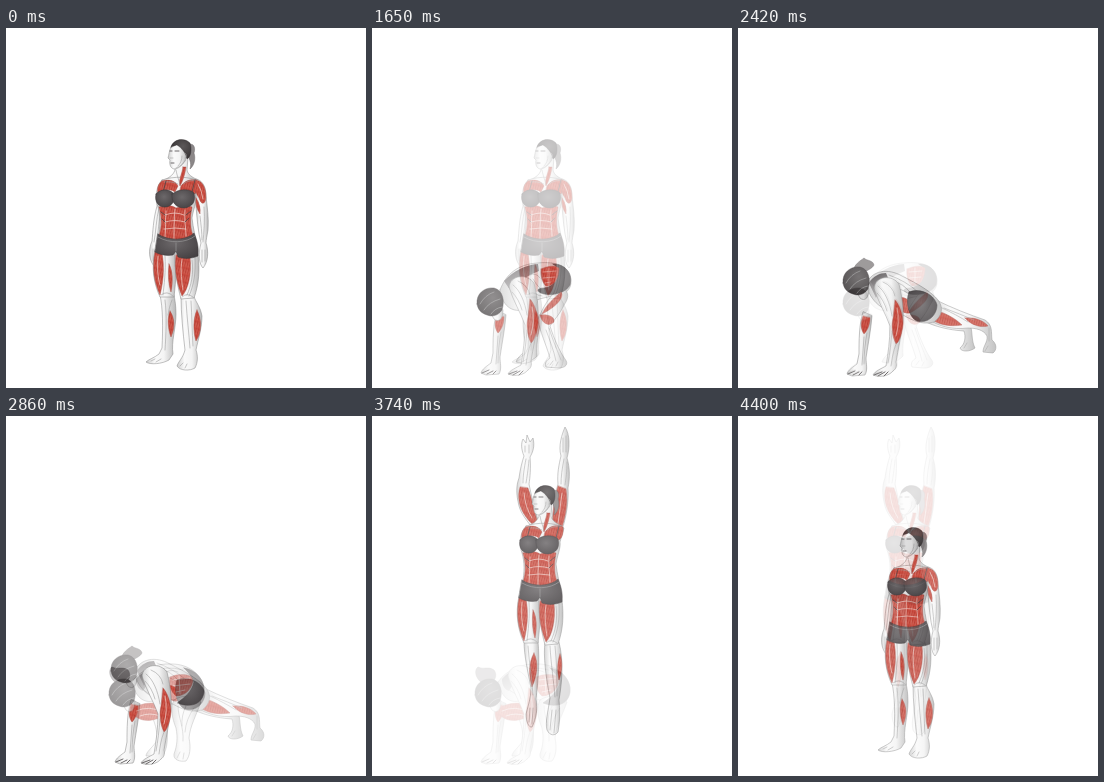
Write an HTML page without scripts that moves like this. It is 360 by 360 pixels and loops after 4510 ms.

```html
<!DOCTYPE html>
<html lang="en">
<head>
<meta charset="utf-8">
<title>Burpee exercise</title>
<style>
html, body { margin: 0; width: 100%; height: 100%; overflow: hidden; background: #fff; }
svg { display: block; width: 100vw; height: 100vh; }
path { stroke-linejoin: round; stroke-linecap: round; }
.skin { fill: url(#skin); stroke: #858585; stroke-width: .5; }
.red { fill: url(#fibre); stroke: #a04a42; stroke-width: .4; }
.cloth { fill: url(#cloth); stroke: #3a3739; stroke-width: .5; }
.shade { fill: url(#shade); }
.hair { fill: url(#hair); stroke: #2b2829; stroke-width: .4; }
.tail { fill: #8b8788; stroke: #5b5758; stroke-width: .4; }
.line { fill: none; stroke: #a0a0a0; stroke-width: .6; }
.dark { fill: none; stroke: #4a4647; stroke-width: .8; }
.pale { fill: none; stroke: #f0d4cf; stroke-width: .7; }

/* Each pose dissolves over the one before it in steps of 110 ms. */
.pose { opacity: 0; animation: 4510ms infinite; }
.down { animation-name: down; }
.plank { animation-name: plank; }
.back { animation-name: back; }
.jump { animation-name: jump; }
.land { animation-name: land; }
@keyframes down {
  0% { opacity: 0; }
  29.268% { opacity: 0; animation-timing-function: steps(6, start); }
  43.902%, 100% { opacity: 1; }
}
@keyframes plank {
  0% { opacity: 0; }
  43.902% { opacity: 0; animation-timing-function: steps(6, start); }
  58.536%, 100% { opacity: 1; }
}
@keyframes back {
  0% { opacity: 0; }
  58.536% { opacity: 0; animation-timing-function: steps(6, start); }
  73.17%, 100% { opacity: 1; }
}
@keyframes jump {
  0% { opacity: 0; }
  73.17% { opacity: 0; animation-timing-function: steps(6, start); }
  87.804%, 100% { opacity: 1; }
}
@keyframes land {
  0% { opacity: 0; }
  87.804% { opacity: 0; animation-timing-function: steps(5, start); }
  100% { opacity: .8333; }
}
</style>
</head>
<body>
<svg viewBox="0 0 360 360">
<defs>
  <linearGradient id="skin">
    <stop offset="0" stop-color="#cecece"/>
    <stop offset=".3" stop-color="#fafafa"/>
    <stop offset=".6" stop-color="#f4f4f4"/>
    <stop offset="1" stop-color="#b8b8b8"/>
  </linearGradient>
  <radialGradient id="cloth" cx=".45" cy=".4" r=".7">
    <stop offset="0" stop-color="#6c686a"/>
    <stop offset="1" stop-color="#444042"/>
  </radialGradient>
  <linearGradient id="shade" x2=".4" y2="1">
    <stop offset="0" stop-color="#5d595b"/>
    <stop offset="1" stop-color="#b5b3b4"/>
  </linearGradient>
  <radialGradient id="hair" cx=".6" cy=".35" r=".7">
    <stop offset="0" stop-color="#5c5859"/>
    <stop offset="1" stop-color="#353132"/>
  </radialGradient>
  <pattern id="fibre" width="2.4" height="7" patternUnits="userSpaceOnUse" patternTransform="rotate(14)">
    <rect width="2.4" height="7" fill="#c9493d"/>
    <path d="M.5 0V5" stroke="#aa392f" stroke-width=".5"/>
    <path d="M1.7 2V6" stroke="#dc7e72" stroke-width=".5"/>
  </pattern>
  <rect id="paper" width="360" height="360" fill="#fff"/>

  <!-- upright head, torso and thighs -->
  <g id="trunk">
    <path class="tail" d="M181 118C187 113 190 119 188 125C190 131 188 138 184 141C186 135 183 130 181 126Z"/>
    <path class="skin" d="M169 136L169 142C167 148 162 150 156 153L192 152C186 149 182 147 181 142L182 129Z"/>
    <path class="skin" d="M149 222C145 240 148 256 154 269L168 269C170 252 171 238 169 224Z"/>
    <path class="skin" d="M169 224C168 240 171 256 175 271L188 270C193 256 194 242 192 226Z"/>
    <path class="red" d="M149 224C146 240 148 254 154 267C157 255 159 240 156 225Z"/>
    <path class="red" d="M163 236C167 243 167 254 165 264C162 255 162 245 163 236Z"/>
    <path class="red" d="M170 227C168 242 171 256 176 268C182 262 186 246 184 229Z"/>
    <path class="pale" d="M176 231C174 243 176 255 177 262M152 228C151 241 152 251 154 257"/>
    <path class="line" d="M189 229C190 244 188 257 183 268M186 232C188 246 185 258 181 267M159 228C160 244 158 257 157 267M155 267Q161 262 167 268M176 269Q181 264 187 269"/>
    <path class="skin" d="M156 152C150 158 150 166 151 176C154 184 155 194 153 206L150 218L191 220C190 210 187 200 186 190C187 182 191 174 190 168L194 154C184 148 168 148 156 152Z"/>
    <path class="red" d="M156 153C162 151 169 152 172 158L169 164C163 160 157 162 152 166C151 160 152 156 156 153Z"/>
    <path class="red" d="M175 158C180 151 187 151 193 153C194 160 191 166 188 166C182 161 178 162 173 166Z"/>
    <path class="red" d="M177 139L180 139C179 146 177 153 174 158C172 153 176 146 177 139Z"/>
    <path class="line" d="M170 142C171 148 173 152 174 157M158 154Q166 153 172 156M177 156Q184 151 190 153"/>
    <path class="red" d="M153 179C162 176 167 178 170 180C176 178 182 177 186 179C184 190 184 200 187 207C182 214 164 215 153 208C156 198 156 190 153 179Z"/>
    <path class="pale" d="M169 181C168 192 168 202 168 212M159 187Q169 183 178 187M159 194Q169 191 179 194M158 201Q169 199 180 201M160 183C159 192 160 201 159 209M179 182C178 191 180 201 180 208"/>
    <path class="dark" d="M155 184l4 3M156 191l3 3M185 183l-5 4M183 190l-4 4M157 164L160 153M186 164L189 152"/>
    <path class="cloth" d="M150 166C154 161 163 160 168 166C169 172 167 178 160 179C153 180 148 174 150 166Z"/>
    <path class="cloth" d="M166 166C172 161 183 160 188 165C190 173 187 179 178 180C170 180 165 174 166 166Z"/>
    <path class="cloth" d="M152 206C162 213 180 213 188 205C191 212 193 219 192 228C185 231 178 231 172 229L170 223L167 227C161 228 154 227 149 224Z"/>
    <path class="line" d="M152 209C164 216 180 215 189 208M170 215V223"/>
    <path class="skin" d="M165 119C163 123 163 127 162 130L164 132C163 137 165 141 169 141C174 140 179 135 181 127L181 116C176 112 168 112 165 119Z"/>
    <path class="hair" d="M165 119C167 111 178 109 184 115C186 121 185 129 181 131C180 125 176 120 171 117Z"/>
    <path class="dark" d="M164 123l2 0M169 123l4 0M165 135l3 0"/>
    <path class="line" d="M164 130l3 0M179 125q3 2 0 5M170 140Q176 138 180 132M176 128Q176 134 172 138"/>
  </g>

  <g id="stand">
    <use href="#paper"/>
    <path class="skin" d="M157 153C151 158 151 168 151 178C147 192 147 204 146 213C142 222 143 232 148 238C152 234 153 224 152 216C155 204 157 190 157 178Z"/>
    <path class="red" d="M156 154C151 159 151 168 152 176L156 170Z"/>
    <path class="line" d="M153 180C150 192 150 204 148 214M155 182C153 193 152 204 151 213M147 221V233M150 221V231"/>
    <path class="skin" d="M154 267C157 280 157 300 156 320L153 326C148 330 143 331 140 334C144 337 156 336 163 332L167 326C165 314 170 300 170 286C170 278 169 272 168 267Z"/>
    <path class="red" d="M164 283C161 290 162 302 165 309C169 300 169 290 164 283Z"/>
    <path class="skin" d="M175 269C175 285 177 305 179 322C177 330 172 334 171 338C174 343 184 343 189 340C192 334 192 328 190 322C192 312 196 300 196 288C195 280 190 274 188 269Z"/>
    <path class="red" d="M191 282C187 290 187 304 190 313C196 304 196 292 191 282Z"/>
    <path class="line" d="M159 272C161 288 160 306 159 322M166 272C164 277 163 281 162 287M180 273C181 290 183 306 184 320M185 273C186 288 186 304 187 318M145 333l4 -2M150 334l5 -3M174 338l3 -3M179 340l2 -4"/>
    <use href="#trunk"/>
    <path class="skin" d="M190 151C196 152 200 158 200 168C201 178 203 190 202 202C201 208 200 212 200 215C203 224 202 234 197 240C193 236 192 226 195 215C192 204 191 190 190 178Z"/>
    <path class="red" d="M190 152C197 153 200 160 200 170C199 177 195 177 193 170C189 164 187 158 190 152Z"/>
    <path class="red" d="M190 170Q195 177 194 186Q189 179 190 170Z"/>
    <path class="line" d="M198 179C199 192 198 204 197 214M194 188C195 197 196 204 196 212M196 222V234M199 222V233"/>
    <path class="pale" d="M192 156Q196 163 197 171"/>
  </g>

  <!-- shared by the poses on the floor -->
  <g id="head">
    <path class="skin" d="M116 287L120 294C125 298 129 294 129 285Z"/>
    <path class="hair" d="M103 279C102 268 111 262 120 263C129 265 131 276 128 285C124 291 118 292 113 290C107 288 104 285 103 279Z"/>
    <path class="line" d="M106 279Q111 270 120 267M110 285Q115 277 126 274M117 289Q121 283 128 282"/>
  </g>
  <g id="far">
    <path class="skin" d="M125 284C121 296 121 314 121 326L119 336C115 339 110 342 109 346L114 348L127 347C130 342 128 336 128 330C130 316 133 302 134 288Z"/>
    <path class="red" d="M125 288C122 296 123 302 126 306C130 302 132 296 132 290Z"/>
    <path class="line" d="M126 309C125 318 125 328 124 337M129 305C127 316 126 326 126 336"/>
    <path class="dark" d="M110 346l7 -3M115 347l6 -3M121 347l3 -3"/>
  </g>
  <g id="near">
    <path class="skin" d="M136 260C137 248 154 246 161 256C164 268 166 282 165 294C163 308 160 322 158 334C159 338 158 341 155 343C151 348 142 350 135 347C137 343 143 341 148 338C150 326 152 312 152 298C148 286 140 274 136 260Z"/>
    <path class="red" d="M157 272C161 276 165 286 165 296C164 306 161 314 158 316C154 308 153 298 155 290Z"/>
    <path class="line" d="M140 258C147 263 152 275 154 288M145 254Q155 258 157 268M158 316C155 323 154 331 153 338M154 303C153 315 152 325 150 335M139 265Q146 272 149 283"/>
    <path class="dark" d="M136 347l8 -3M140 348l7 -4M146 348l4 -4"/>
    <path class="pale" d="M159 280Q162 294 158 308"/>
  </g>

  <g id="squat">
    <use href="#paper"/>
    <use href="#far"/>
    <path class="skin" d="M146 300C150 310 152 318 150 326C146 332 140 336 140 340L156 340C162 334 162 322 161 304Z"/>
    <path class="red" d="M125 295C132 287 148 284 160 291C162 298 158 303 150 303C142 306 130 305 125 295Z"/>
    <path class="pale" d="M130 295Q143 289 157 296M134 300Q144 296 154 300"/>
    <path class="skin" d="M126 266C134 254 150 247 166 248C182 248 196 258 198 272C198 284 190 292 178 292C166 290 160 284 150 284C140 288 130 284 126 266Z"/>
    <path class="line" d="M142 256Q160 249 177 254M156 258Q164 252 172 256M163 283Q172 286 180 281M132 269Q138 276 148 280"/>
    <path class="shade" d="M130 263C134 258 140 254 146 251L151 256C146 262 141 268 137 275C132 273 130 269 130 263Z"/>
    <path class="red" d="M164 261C172 257 184 258 187 262C187 272 180 280 170 280C165 276 162 268 164 261Z"/>
    <path class="pale" d="M167 264L184 262M167 270L184 268M170 276L179 274M173 260L174 278"/>
    <path class="skin" d="M168 284C176 278 190 280 195 286C190 300 184 310 183 322C185 332 184 340 180 345C174 346 167 344 168 338C171 330 172 322 170 312C166 302 164 292 168 284Z"/>
    <path class="cloth" d="M178 252C190 254 199 264 198 276C196 289 184 292 171 287C178 282 186 276 188 266C186 260 182 256 178 252Z"/>
    <path class="line" d="M172 290C172 301 178 311 177 325M188 292Q180 303 179 316M180 290Q175 300 176 310M171 342l3 -6M177 343l1 -6"/>
    <use href="#near"/>
    <path class="tail" d="M110 267C103 262 102 254 106 251C112 254 116 250 122 254C125 258 124 263 120 267Z"/>
    <use href="#head"/>
  </g>
</defs>

<use href="#stand"/>

<g class="pose down">
  <use href="#paper"/>
  <use href="#far" y="-1"/>
  <path class="skin" d="M152 284C160 280 168 286 168 296C166 308 164 318 165 328C160 334 150 336 144 334C146 328 151 326 154 322C152 310 150 296 152 284Z"/>
  <path class="skin" d="M128 262C134 246 146 236 166 235C184 233 198 238 199 252C200 262 192 268 182 268C170 270 158 272 150 282C140 284 130 278 128 262Z"/>
  <path class="shade" d="M132 253C142 243 152 237 166 236L167 243C156 247 146 254 140 265Z"/>
  <path class="line" d="M161 251Q166 260 174 265M155 257Q161 267 170 268M158 247Q164 244 168 250M158 290C161 303 158 314 158 326"/>
  <path class="skin" d="M188 258C197 262 198 269 192 277C188 286 182 292 178 298C182 311 188 324 193 331C197 336 194 340 186 340L174 339C172 335 175 332 178 330C174 316 168 304 166 292C170 280 178 268 188 258Z"/>
  <path class="cloth" d="M181 236C194 236 201 246 198 257C194 264 184 268 172 266C164 264 164 260 172 260C182 259 188 250 186 240Z"/>
  <path class="red" d="M169 241C175 238 183 237 187 240C187 251 182 258 174 258C170 254 168 248 169 241Z"/>
  <path class="pale" d="M171 244L184 243M171 250L183 249M173 255L179 254M177 240V257"/>
  <path class="red" d="M189 264C193 268 186 278 170 286C174 277 182 270 189 264Z"/>
  <path class="red" d="M168 287C175 286 183 288 182 294C177 299 170 296 168 287Z"/>
  <path class="line" d="M174 302C178 313 182 323 184 333M177 300C181 313 186 324 189 332M178 337l3 -4M184 338l2 -4"/>
  <use href="#near" x="1" y="-1"/>
  <use href="#head" x="2" y="-3"/>
</g>

<g class="pose plank">
  <use href="#paper"/>
  <use href="#far"/>
  <path class="skin" d="M190 284C206 286 222 292 232 296C235 304 233 312 237 320C232 324 223 324 222 320C227 316 228 309 226 303C210 302 196 298 188 294Z"/>
  <path class="skin" d="M198 272C214 280 232 287 247 292C255 297 253 304 254 312C259 316 259 322 255 325L245 324C245 318 250 314 249 308C246 302 238 300 230 300C214 302 200 298 192 292Z"/>
  <path class="red" d="M194 283C206 283 218 291 224 297C212 299 200 297 194 291Z"/>
  <path class="red" d="M227 290C236 289 245 292 250 298C242 300 233 297 227 290Z"/>
  <path class="line" d="M202 279Q219 287 230 294M206 280Q222 286 236 292M251 300V313M247 323l3 -5M226 320l3 -5"/>
  <path class="skin" d="M128 256C134 242 150 240 164 248C180 256 194 264 200 272C206 280 204 288 196 294C182 298 170 290 160 284C146 284 132 274 128 256Z"/>
  <path class="shade" d="M131 255C135 248 142 245 148 245L151 252C145 257 141 264 138 270Z"/>
  <path class="line" d="M151 247Q168 253 180 264M160 261Q168 262 175 270M156 253Q165 256 172 264"/>
  <path class="red" d="M162 270C168 268 173 274 175 281C173 287 167 286 162 282Z"/>
  <path class="cloth" d="M171 264C184 259 197 268 199 277C199 287 190 296 179 293C171 290 167 274 171 264Z"/>
  <use href="#near"/>
  <path class="tail" d="M115 244C116 236 122 233 126 230C129 233 135 232 136 237C134 241 128 243 124 245Z"/>
  <use href="#head" x="2" y="-24"/>
</g>

<use class="pose back" href="#squat"/>

<g class="pose jump">
  <use href="#paper"/>
  <path class="skin" d="M162 114C156 106 149 98 147 90C144 78 144 70 147 62C148 54 150 46 152 40C149 33 149 27 151 23L154 27L155 19L158 26L161 22C163 30 161 36 158 41C159 52 158 62 157 68C159 78 162 90 166 104Z"/>
  <path class="red" d="M148 71C145 80 147 92 154 101C159 108 164 112 165 104C161 92 160 82 156 72Z"/>
  <path class="skin" d="M180 113C180 98 182 82 186 68C185 58 187 48 189 40C186 30 190 18 193 11C198 18 198 32 195 42C198 52 198 62 196 72C197 86 194 102 190 114Z"/>
  <path class="red" d="M186 70C183 82 180 96 181 111L189 114C194 100 196 86 194 73Z"/>
  <path class="line" d="M154 43C152 53 151 60 151 67M157 44C156 55 155 61 154 67M153 30V36M157 29V37M192 43C190 53 189 61 189 68M195 46C195 56 194 62 193 69M191 22V36M194 20V36"/>
  <path class="pale" d="M152 77Q153 91 160 102M190 77Q188 93 186 108"/>
  <path class="skin" d="M152 225C152 240 156 256 159 272C159 282 156 290 154 298C154 306 157 312 160 311C164 303 166 293 164 283C166 266 168 246 166 225Z"/>
  <path class="red" d="M162 237C156 247 157 261 160 271C165 260 167 247 162 237Z"/>
  <path class="skin" d="M173 226C171 240 174 262 178 282C176 296 173 306 175 314C178 320 183 320 186 316C188 306 188 294 187 284C190 266 192 246 187 226Z"/>
  <path class="red" d="M188 238C185 246 185 256 187 264C190 256 191 246 188 238Z"/>
  <path class="line" d="M156 230C157 246 160 263 161 279M178 230C179 249 182 267 183 281M183 230C185 248 185 264 185 280M158 292L157 306M161 292L160 308M180 294L178 314M184 294L182 317"/>
  <use href="#trunk" x="-2" y="-42"/>
</g>

<use class="pose land" href="#stand"/>
</svg>
</body>
</html>
```
